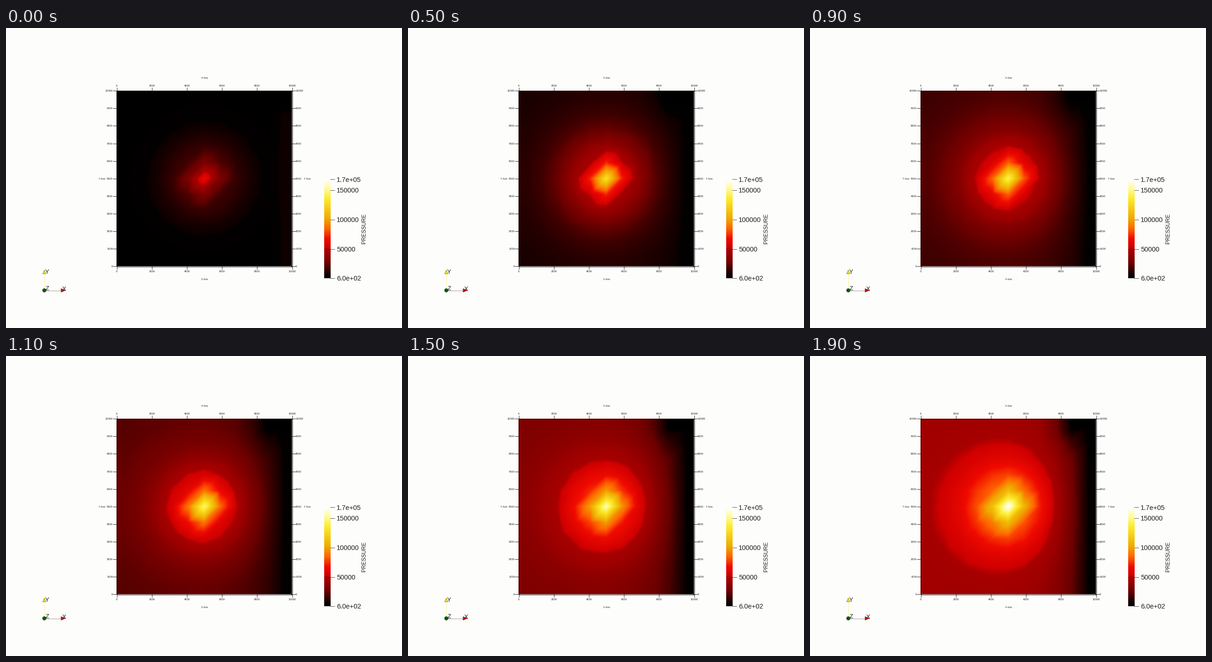
Recreate the animation shown at these times as a matplotlib script. Size 860 by 651 pixels, loop 2000 ms.

```python
import numpy as np
import matplotlib.pyplot as plt
from matplotlib.animation import FuncAnimation
from matplotlib.colors import LinearSegmentedColormap
from matplotlib.patches import Circle, Polygon, Rectangle

W, H, DPI = 860, 651, 64
FRAMES = 20
CELLS = 11
LEFT, RIGHT, TOP, BOTTOM = 240, 621, 136, 517
INK = "#1c1c1c"

heat = LinearSegmentedColormap.from_list("heat", [
    (0, "#000000"), (.028, "#040000"), (.032, "#0d0000"), (.10, "#400000"),
    (.15, "#6c0000"), (.25, "#9d0000"), (.293, "#a80000"), (.31, "#d00000"),
    (.40, "#f00a00"), (.50, "#ff6400"), (.60, "#f0a800"), (.80, "#fdeb28"),
    (.90, "#fffa96"), (1, "#ffffff")], N=1024)

# Cell grid: well in the middle, drained right side, low spot at the upper right.
i, j = np.meshgrid(np.arange(CELLS), np.arange(CELLS))
dx, dy = i - 5, j - 5
corner = np.abs(dx * dy) == 1
radius = np.hypot(dx, dy) + corner * (.27 - .09 * dx * dy)
q = i / (CELLS - 1)
slope = 1.08 - .12 * q - .85 * q ** 7
spot = 1 - .97 * np.exp(-(i - 9.2) ** 2 - (j - 10) ** 2)

# Sample positions in cell-centre coordinates, y pointing up.
n = RIGHT - LEFT
pos = np.clip((np.arange(n) + .5) / n * CELLS - .5, 0, CELLS - 1)
sx, sy = np.meshgrid(pos, pos[::-1])
ix = np.minimum(sx.astype(int), CELLS - 2)
iy = np.minimum(sy.astype(int), CELLS - 2)
u, v = sx - ix, sy - iy


def cell_values(k):
    """Pressure per cell as a fraction of full scale at step k."""
    early = np.exp(-k / 2)
    floor = .235 * ((k + 1) / FRAMES) ** 1.5
    p = floor + (.76 - .38 * early) * np.exp(-(.62 + .13 * early) * radius)
    p *= slope ** np.sqrt(k / (FRAMES - 1)) * spot
    p[:-1, -1] = np.maximum(p[:-1, -1], .036 * np.exp(-k / 9))
    return p


def field(k):
    """Linear interpolation over triangles split along the rising diagonal."""
    p = cell_values(k)
    a, b = p[iy, ix], p[iy, ix + 1]
    c, d = p[iy + 1, ix], p[iy + 1, ix + 1]
    return np.where(u >= v, a + u * (b - a) + v * (d - b),
                    a + v * (c - a) + u * (d - c))


fig = plt.figure(figsize=(W / DPI, H / DPI), dpi=DPI, facecolor="#fdfdfc")
ax = fig.add_axes([0, 0, 1, 1])
ax.axis("off")


def label(x, y, s, px, ha="center", va="center_baseline", **kw):
    ax.text(x, y, s, fontsize=px * 72 / DPI, ha=ha, va=va, color=INK,
            family="Liberation Sans", **kw)


def line(xs, ys, color=INK, px=.9):
    ax.plot(xs, ys, color=color, lw=px * 72 / DPI, zorder=3,
            solid_capstyle="butt")


def draw_axes():
    ax.add_patch(Rectangle((LEFT + .5, TOP + .5), n, BOTTOM - TOP,
                           fill=False, ec="black", lw=1.1, zorder=3))
    for val in range(0, 10001, 2000):
        x = LEFT + .5 + val / 10000 * n
        line([x, x], [129, 139])
        line([x, x], [514, 524])
        label(x, 125.3, str(val), 5.8)
        label(x, 528.3, str(val), 5.8)
    for val in range(0, 10001, 1000):
        y = BOTTOM + .2 - val / 10000 * (BOTTOM - TOP)
        line([232, 242], [y, y])
        line([619, 629], [y, y])
        label(232, y, str(val), 5.8, "right")
        label(629, y, str(val), 5.8, "left")
    for y in (107.5, 545.3):
        label(431, y, "X Axis", 5.3)
    for x in (208, 654):
        label(x, 326.8, "Y Axis", 5.3)


def draw_colorbar():
    top, bottom, low, high = 328, 543, 600, 168500
    ax.imshow(np.linspace(1, 0, bottom - top)[:, None], cmap=heat, vmin=0,
              vmax=1, aspect="auto", extent=(691, 705, bottom, top),
              interpolation="nearest")
    for val in (low, 50000, 100000, 150000, high):
        y = bottom - (val - low) / (high - low) * (bottom - top)
        line([704, 713.5], [y, y], "#555555", 1)
        text = f"{val:.1e}" if val in (low, high) else str(val)
        label(718, y, text, 14.5, "left")
    label(778, 435.5, "PRESSURE", 12, va="center", rotation=90)


def draw_triad():
    line([83, 83], [569, 533], "#f6f2a0", 1)
    line([83, 120], [569.5, 569.5], "#a89a9a", 1)
    ax.add_patch(Polygon([(83.2, 525), (79.5, 533.5), (87, 533.5)],
                         fc="#e6e010", ec="#6a6820", lw=.7, zorder=4))
    ax.add_patch(Polygon([(129, 569.5), (119.5, 565.5), (119.5, 573.3)],
                         fc="#e01008", ec="#701010", lw=.7, zorder=4))
    ax.add_patch(Circle((83.2, 569.3), 4, fc="#0a5a0c", ec="#0a400c",
                        lw=.6, zorder=4))
    for x, y, s in ((88.8, 528.8, "Y"), (125.6, 565.5, "X"), (89.6, 564.7, "Z")):
        label(x, y, s, 13, zorder=5)


plot = ax.imshow(field(0), cmap=heat, vmin=0, vmax=1, aspect="auto",
                 extent=(LEFT, RIGHT, BOTTOM, TOP), interpolation="nearest")
draw_axes()
draw_colorbar()
draw_triad()
ax.set_xlim(0, W)
ax.set_ylim(H, 0)


def update(k):
    plot.set_data(field(k))
    return [plot]


anim = FuncAnimation(fig, update, frames=FRAMES, interval=100,
                     init_func=lambda: update(0), repeat=True,
                     repeat_delay=0, blit=False)
plt.show()
```
